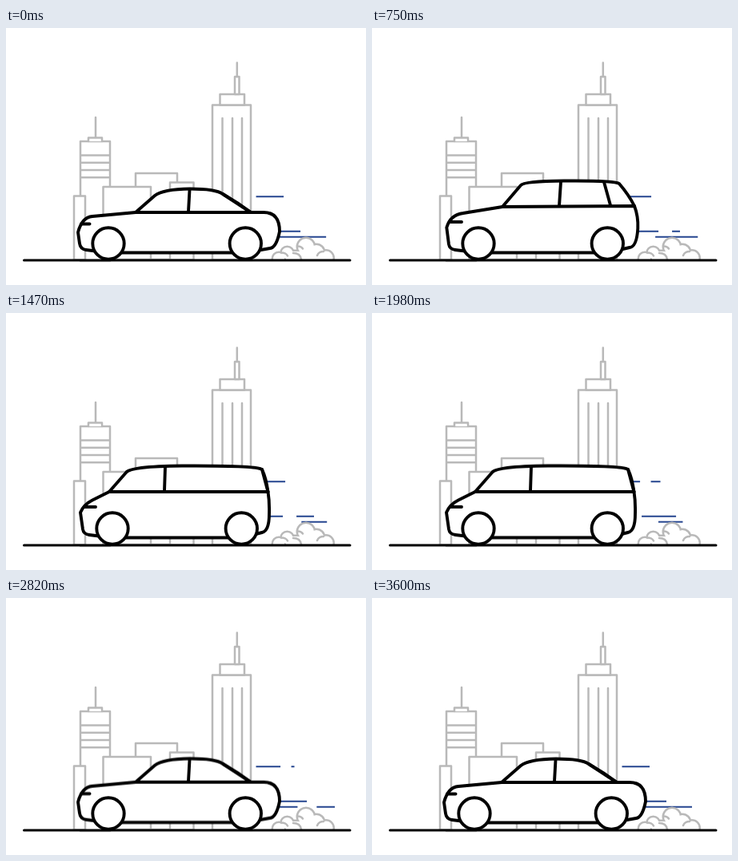
Write an HTML page without scripts that moves like this. It is 450x322 px and loops after 3.63 s.

```html
<!DOCTYPE html>
<html lang="en">
<head>
<meta charset="utf-8">
<title>Morphing car</title>
<style>
  html, body { margin: 0; width: 100%; height: 100%; overflow: hidden; background: #fff; }
  body > svg { display: block; width: 450px; height: 322px; }
  g { stroke-linecap: round; stroke-linejoin: round; }

  .city { fill: #fff; stroke: #b9b9b9; stroke-width: 2.5; }
  .floors { stroke-width: 37; stroke-dasharray: 2.5 6.8; stroke-linecap: butt; }
  .puffs { fill: #fff; }
  .puffs.edge { stroke: #b9b9b9; stroke-width: 5; }
  .folds { fill: none; stroke: #b9b9b9; stroke-width: 2.5; }
  .car { fill: #fff; stroke: #000; stroke-width: 3.9; }
  .ground { stroke: #000; stroke-width: 3; stroke-linecap: round; }

  /* Wind: whole laps of dash + gap in 3600 ms, then a 30 ms rest */
  .wind { stroke: #25458f; stroke-width: 2; stroke-linecap: butt; }
  .wind line { animation: flow 3630ms linear infinite; }
  .high { --laps: 5; --lap: 48px; stroke-dasharray: 34.5 13.5; }
  .middle { --laps: 4; --lap: 60px; stroke-dasharray: 43 17; }
  .low { --laps: 6; --lap: 76px; }
  .wind .low { animation: flow 3630ms linear infinite, shrink 3630ms cubic-bezier(.5, 0, .5, 1) infinite; }
  @keyframes flow {
    from { stroke-dashoffset: 0px; }
    99.17%, to { stroke-dashoffset: calc(var(--laps) * var(--lap) * -1); }
  }
  @keyframes shrink {
    0%, 99.17%, 100% { stroke-dasharray: 65px 11px; }
    49.6% { stroke-dasharray: 30px 46px; }
  }

  /* Each part names its three shapes; one timeline blends them */
  .shell path { animation: morph 3630ms cubic-bezier(.4, 0, .3, 1.3) infinite; }
  .shell { animation: bob 242ms ease-in-out infinite; }
  .wheel { animation: shift 3630ms cubic-bezier(.4, 0, .3, 1.3) infinite; }
  .body {
    --sedan: path("M162 231L108 236Q95 237 90 256L92 270Q93 277 100 278L128 281.5H299L330 276Q338 275 342 255Q342 231 322 231Z");
    --suv: path("M163 224L114 232Q98 234 93.3 250L96 271Q97 277 104 278L133 281.5H294L322 275Q331 274 332.3 251Q333 236 328 223Z");
    --van: path("M129 224L108 234.5Q97 240 93 250L96 271Q97 277 104 278L133 281.5H294L320 275Q329 273 329 252Q329.5 236 327.5 224Z");
  }
  .roof {
    --sedan: path("M162 231L186 210Q196 202 230 201.5Q262 201.5 271 208Q290 219 306 231");
    --suv: path("M163 224L186 197Q190 192 240 191.5Q304 191 309 195Q321 209 328 223");
    --van: path("M129 224L150 200Q155 192 220 191.5Q314 191 320 196Q325 206 327.5 224");
  }
  .pillars {
    --sedan: path("M229.5 203L228 230M271 208L306 231");
    --suv: path("M236 193L234 223M290 193L298 222");
    --van: path("M199 193L198 223M320 196L327.5 224");
  }
  .lamp {
    --sedan: path("M94 245.5H104.5");
    --suv: path("M98 243H112");
    --van: var(--suv);
  }
  @keyframes morph {
    0%, .8%, 73.6%, 100% { d: var(--sedan); }
    9.1%, 32.2% { d: var(--suv); }
    40.5%, 65.3% { d: var(--van); }
  }
  @keyframes shift {
    0%, .8%, 73.6%, 100% { transform: translateX(0); }
    9.1%, 65.3% { transform: translateX(var(--inset)); }
  }
  @keyframes bob { 50% { transform: translateY(-.4px); } }
</style>
</head>
<body>
<svg viewBox="0 0 450 322">
  <g class="city">
    <rect x="93" y="142" width="37" height="150"/>
    <line class="floors" x1="111.5" x2="111.5" y1="158.2" y2="189"/>
    <path d="M103 142v-4.5h17v4.5m-8-5v-25"/>
    <rect x="85" y="210.5" width="14" height="80"/>
    <rect x="162" y="182" width="52" height="108"/>
    <rect x="205" y="193.5" width="29.5" height="97"/>
    <rect x="121.5" y="199" width="59.5" height="91"/>
    <rect x="258" y="96.5" width="48" height="194"/>
    <rect x="267.5" y="83" width="30.5" height="13.5"/>
    <rect x="286" y="61" width="5.5" height="22"/>
    <path d="M288.8 61v-17.5M270.5 113v127m12.5-127v127m12-127v127"/>
  </g>

  <g class="wind">
    <line class="high" x1="312.5" x2="360.5" y1="211.2" y2="211.2"/>
    <line class="middle" x1="325" x2="385" y1="254.7" y2="254.7"/>
    <line class="low" x1="335" x2="411" y1="261.7" y2="261.7"/>
  </g>

  <!-- Clipped at the ground; the white copy leaves only the outer rim -->
  <svg width="450" height="291">
    <defs>
      <g id="puffs">
        <circle cx="341" cy="289" r="7"/>
        <circle cx="351.5" cy="282" r="7"/>
        <circle cx="375" cy="274" r="10"/>
        <circle cx="388" cy="281" r="9"/>
        <circle cx="400" cy="288" r="8.5"/>
        <rect x="350" y="280" width="44" height="16"/>
      </g>
    </defs>
    <use class="puffs edge" href="#puffs"/>
    <use class="puffs" href="#puffs"/>
    <g class="folds">
      <path d="M344 281.5q6 0 8 4M359 282q9 0 10 8M365 273.5q4 0 6 3M397 280q-6 0-8 5"/>
    </g>
  </svg>

  <line class="ground" x1="22.5" x2="430" y1="291" y2="291"/>

  <g class="car">
    <g class="shell">
      <path class="roof"/>
      <path class="body"/>
      <path class="pillars"/>
      <path class="lamp"/>
    </g>
    <circle class="wheel" style="--inset: 5px" cx="128" cy="270" r="19.7"/>
    <circle class="wheel" style="--inset: -5px" cx="299.3" cy="270" r="19.7"/>
  </g>
</svg>
</body>
</html>
```
